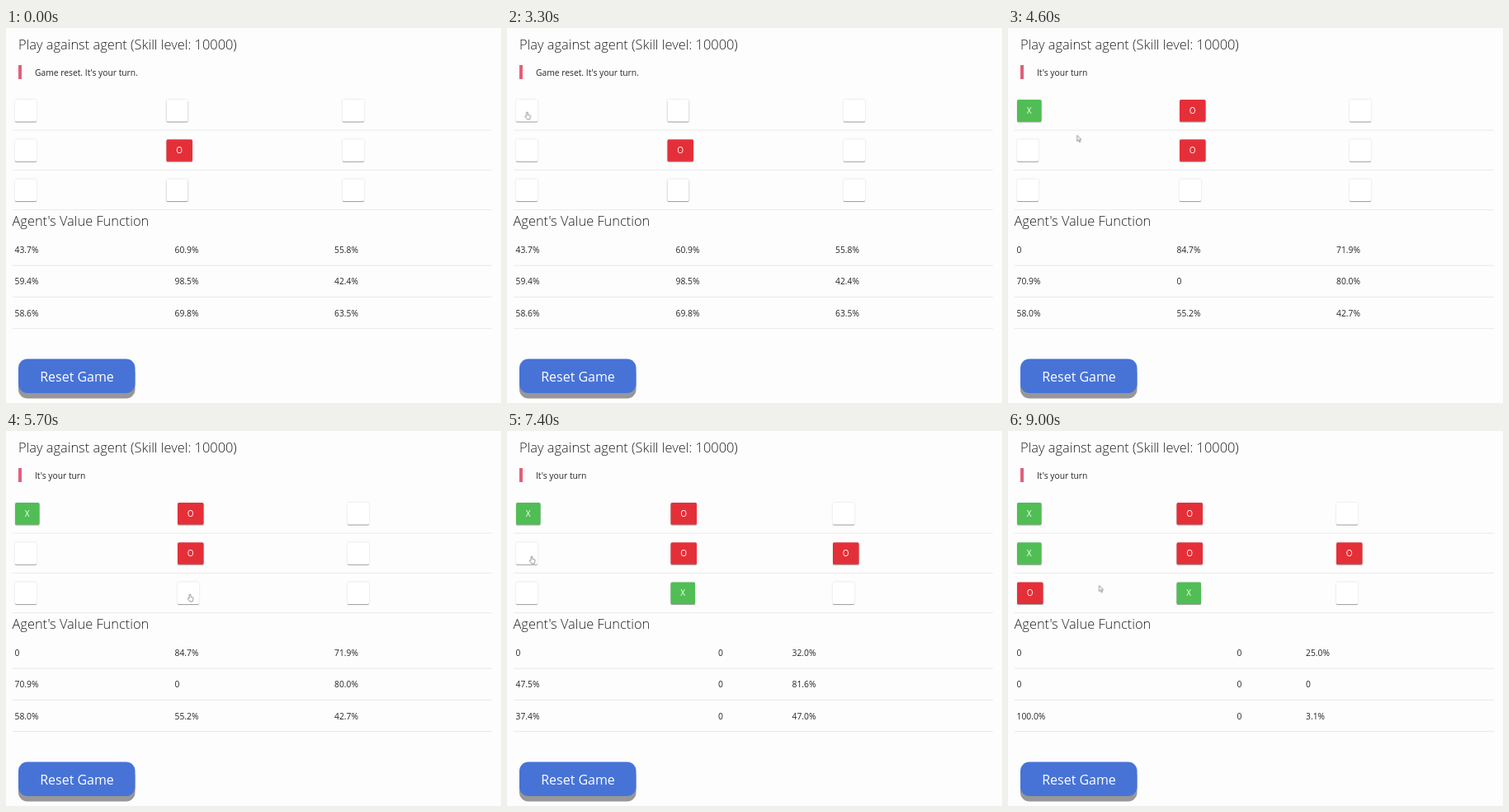
Recreate the animation shown at these times as an HTML page. Size 600 px wide and 455 px high, loop 9100 ms.

```html
<!DOCTYPE html>
<html lang="en">
<head>
<meta charset="utf-8">
<title>Tic-tac-toe against an agent</title>
<style>
html, body { margin: 0; width: 100%; height: 100%; overflow: hidden; background: #fdfdfe; }
svg { display: block; width: 600px; height: 455px; }
text { font: 10.3px "Open Sans", "Noto Sans", sans-serif; fill: #262626; }
.title { font-size: 16.4px; font-weight: 300; fill: #222; }
.mark { font-size: 10px; fill: #fff; text-anchor: middle; }
.reset { font-size: 16px; fill: #fff; text-anchor: middle; }
.line { stroke: #e9e9ea; }
.cell {
  fill: var(--c);
  filter: drop-shadow(0 1px .7px rgba(0,0,0,.32)) drop-shadow(0 0 .8px rgba(0,0,0,.14));
}

/* One loop is 9.1 s, so 100 ms is 1.0989 %. */
.state, .arrow, .hand { animation: 9.1s step-end infinite; }
.s0 { animation-name: show0; }
.s1 { animation-name: show1; }
.s2 { animation-name: show2; }
.s3 { animation-name: show3; }
@keyframes show0 { 0% { visibility: visible } 37.363%, 100% { visibility: hidden } }
@keyframes show1 { 0% { visibility: hidden } 37.363% { visibility: visible } 64.835%, 100% { visibility: hidden } }
@keyframes show2 { 0% { visibility: hidden } 64.835% { visibility: visible } 86.813%, 100% { visibility: hidden } }
@keyframes show3 { 0% { visibility: hidden } 86.813%, 100% { visibility: visible } }

/* Freshly played cells fade from white over 400 ms. */
.fresh { animation: 9.1s cubic-bezier(.25,.8,.25,1) infinite; }
.s1 .fresh { animation-name: paint1; }
.s2 .fresh { animation-name: paint2; }
.s3 .fresh { animation-name: paint3; }
@keyframes paint1 { 0%, 37.363% { fill: #fff } 41.758%, 100% { fill: var(--c) } }
@keyframes paint2 { 0%, 64.835% { fill: #fff } 69.231%, 100% { fill: var(--c) } }
@keyframes paint3 { 0%, 86.813% { fill: #fff } 91.209%, 100% { fill: var(--c) } }

.pointer { animation: move 9.1s step-end infinite; }
.pointer path { fill: #fff; stroke: #555; stroke-width: .6; stroke-linejoin: round; }
.arrow { animation-name: arrow; }
.hand { animation-name: hand; }
@keyframes move {
  0% { transform: translate(535px, 190px) }
  14.286% { transform: translate(535px, 190px); animation-timing-function: steps(4) }
  18.681% { transform: translate(260px, 192px); animation-timing-function: steps(5) }
  24.176% { transform: translate(84px, 201px); animation-timing-function: steps(6) }
  30.769% { transform: translate(24.5px, 102px) }
  47.253% { transform: translate(24.5px, 102px); animation-timing-function: steps(10) }
  58.242% { transform: translate(222px, 196px); animation-timing-function: steps(2) }
  60.44% { transform: translate(223px, 198px) }
  73.626% { transform: translate(223px, 198px); animation-timing-function: steps(7) }
  81.319% { transform: translate(30px, 152px) }
  98.901%, 100% { transform: translate(110.5px, 187.5px) }
}
@keyframes arrow {
  0% { opacity: 0 }
  14.286% { opacity: 1 }
  29.67% { opacity: 0 }
  49.451% { opacity: 1 }
  58.242% { opacity: 0 }
  75.824% { opacity: 1 }
  81.319% { opacity: 0 }
  98.901%, 100% { opacity: 1 }
}
@keyframes hand {
  0% { opacity: 0 }
  29.67% { opacity: 1 }
  49.451% { opacity: 0 }
  58.242% { opacity: 1 }
  75.824% { opacity: 0 }
  81.319% { opacity: 1 }
  98.901%, 100% { opacity: 0 }
}
</style>
</head>
<body>
<svg viewBox="0 0 600 455">
  <text class="title" x="15" y="26">Play against agent (Skill level: 10000)</text>
  <rect x="15" y="45" width="4" height="17" fill="#e0607a"/>
  <text class="title" x="7.5" y="239.5">Agent's Value Function</text>
  <path class="line" d="M8 124H589M8 172.3H589M8 220.6H589M8 288.2H589M8 326.4H589M8 364.6H589"/>
  <g id="states"></g>
  <rect x="15" y="408" width="141.5" height="41.5" rx="11" fill="#979797"/>
  <rect x="15" y="401.5" width="141.5" height="41.5" rx="11" fill="#4773d7"/>
  <text class="reset" x="86" y="429">Reset Game</text>
  <g class="pointer">
    <path class="arrow" d="M0 0V7.2L1.7 5.6 2.9 8.4 4 7.9 2.8 5.2H5z"/>
    <path class="hand" d="M-.9 5V.9a.9.9 0 0 1 1.8 0V3.2l2.2.6q1.1.3.9 1.4l-.4 2.2-.7 1.6H.1L-2.4 5.9q-.5-1.1.5-1.2z"/>
  </g>
</svg>
<script>
const kinds = {
  "-": { width: 26, color: "#fff" },
  X: { width: 29.5, color: "#50be54" },
  O: { width: 31.5, color: "#e52f38" }
};

const states = [
  { board: "----O----", cols: [11, 194.5, 408], valueCols: [10.5, 204.5, 398],
    values: "43.7% 60.9% 55.8% 59.4% 98.5% 42.4% 58.6% 69.8% 63.5%" },
  { board: "XO--O----", cols: [11, 208, 414], valueCols: [10.5, 204.5, 398],
    values: "0 84.7% 71.9% 70.9% 0 80.0% 58.0% 55.2% 42.7%" },
  { board: "XO--OO-X-", cols: [11, 198.5, 395], valueCols: [10.5, 256, 345.5],
    values: "0 0 32.0% 47.5% 0 81.6% 37.4% 0 47.0%" },
  { board: "XO-XOOOX-", cols: [11, 204.5, 398], valueCols: [10.5, 277.5, 361],
    values: "0 0 25.0% 0 0 0 100.0% 0 3.1%" }
];

const label = (x, y, str, cls = "") => `<text class="${cls}" x="${x}" y="${y}">${str}</text>`;

function cell(x, row, mark, fresh) {
  const { width, color } = kinds[mark];
  const y = 87 + row * 48.2;
  const box = `<rect class="cell ${fresh ? "fresh" : ""}" style="--c:${color}"
    x="${x}" y="${y}" width="${width}" height="26.5" rx="1.5"/>`;
  return mark === "-" ? box : box + label(x + width / 2, y + 16.8, mark, "mark");
}

function drawState({ board, cols, valueCols, values }, n) {
  const before = n ? states[n - 1].board : board;
  const cells = [...board].map((mark, i) =>
    cell(cols[i % 3], Math.floor(i / 3), mark, mark !== before[i]));
  const numbers = values.split(" ").map((v, i) =>
    label(valueCols[i % 3], 273.2 + Math.floor(i / 3) * 38.2, v));
  const message = n ? "It's your turn" : "Game reset. It's your turn.";
  return `<g class="state s${n}">${label(35, 57.8, message)}${cells.join("")}${numbers.join("")}</g>`;
}

document.getElementById("states").innerHTML = states.map(drawState).join("");
</script>
</body>
</html>
```
